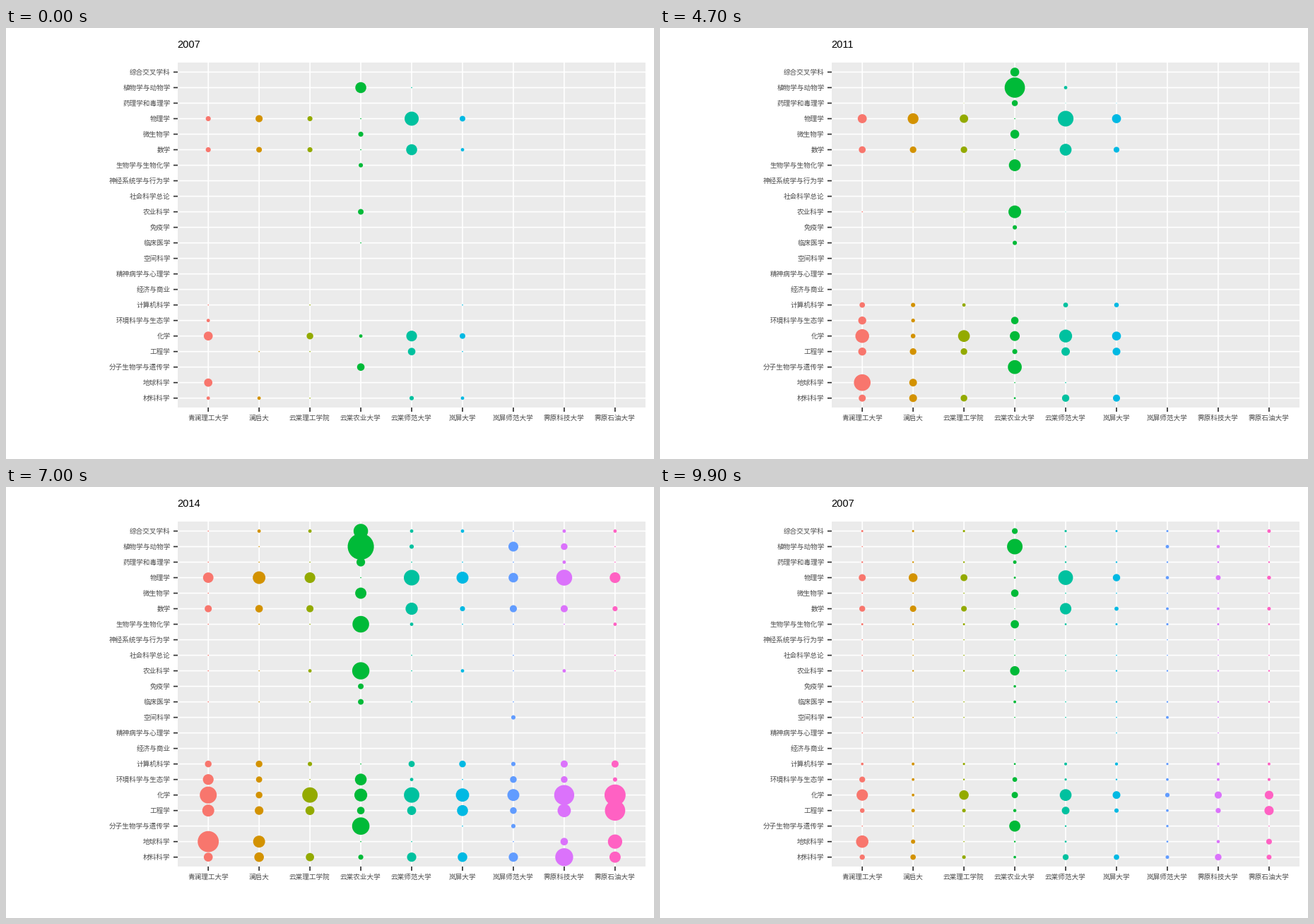
These frames come from a looping animation (917x611 px, 10000 ms). A matplotlib script:

```python
import numpy as np
import matplotlib.pyplot as plt
from matplotlib.animation import FuncAnimation
from matplotlib.colors import to_rgb
from matplotlib.patches import Rectangle

W, H, DPI = 917, 611, 72  # at 72 dpi one point is one pixel
LEFT, TOP, RIGHT, BOTTOM = 243, 49, 905, 538
X0, DX = 286.2, 71.96
Y0, DY = 62.5, 22.01
TICK = 6
CJK, LATIN = "Noto Sans CJK JP", "Liberation Sans"

FIRST_YEAR, YEARS = 2007, 10
STEPS, HOLD = 10, 6  # frames per year; the last still frame of each year
BASE, GAIN = 0.8, 1.6  # radius of a one-paper dot; growth per root of papers

# Usual trend of each subject: size in the first and in the last year.
# A size below zero means no papers, so no dot.
TRENDS = {
    "综合交叉学科": (-5, 2.8),
    "植物学与动物学": (-3, 0),
    "药理学和毒理学": (-2, 1.8),
    "物理学": (3, 8),
    "微生物学": (-2, 0.3),
    "数学": (3, 5),
    "生物学与生物化学": (-4, 2.3),
    "神经系统学与行为学": (-2, 0),
    "社会科学总论": (-2, 0.5),
    "农业科学": (-1.5, 1.8),
    "免疫学": (-9, -3),
    "临床医学": (-3, 1.2),
    "空间科学": (-4, 0.2),
    "精神病学与心理学": (-4, -0.2),
    "经济与商业": (-5, -0.5),
    "计算机科学": (0, 5),
    "环境科学与生态学": (-0.5, 5),
    "化学": (3, 9),
    "工程学": (1, 7),
    "分子生物学与遗传学": (-4, 0.8),
    "地球科学": (-0.5, 1.5),
    "材料科学": (1.5, 7.3),
}
SUBJECTS = list(TRENDS)

# Name, colour, first year with papers, and the subjects with their own trend.
SCHOOLS = [
    ("青澜理工大学", "#F8766D", 2007, {
        "化学": (5.8, 12.5), "工程学": (0.5, 10), "地球科学": (5.8, 17),
        "环境科学与生态学": (2.2, 8.5)}),
    ("澜启大", "#D39200", 2007, {
        "物理学": (4, 9.6), "化学": (0, 5), "地球科学": (0, 9.5)}),
    ("云棠理工学院", "#93AA00", 2007, {
        "化学": (4.2, 11.7), "地球科学": (-3, 0), "计算机科学": (0, 3),
        "环境科学与生态学": (-6, 2)}),
    ("云棠农业大学", "#00BA38", 2007, {
        "综合交叉学科": (-1, 13), "植物学与动物学": (7.2, 20),
        "药理学和毒理学": (0, 6.8), "物理学": (0.5, 1.7),
        "微生物学": (2, 9.5), "数学": (0, 0), "生物学与生物化学": (2.5, 13.5),
        "农业科学": (3.3, 14), "免疫学": (-1, 4.4), "临床医学": (0, 4.5),
        "计算机科学": (-2, 2.2), "环境科学与生态学": (-0.5, 10),
        "化学": (2.2, 10.4), "工程学": (0, 5.5),
        "分子生物学与遗传学": (4.5, 14), "材料科学": (-1, 4)}),
    ("云棠师范大学", "#00C19F", 2007, {
        "植物学与动物学": (0, 2.8), "物理学": (9.2, 11), "数学": (6.8, 8.2),
        "环境科学与生态学": (-4, 3), "化学": (7.2, 9.8),
        "工程学": (4.5, 5.3)}),
    ("岚屏大学", "#00B9E3", 2007, {
        "数学": (2, 3.6), "环境科学与生态学": (-3, 2), "工程学": (1, 9),
        "地球科学": (-1, 0.2)}),
    ("岚屏师范大学", "#619CFF", 2013, {
        "植物学与动物学": (4, 6.7), "物理学": (8, 6), "空间科学": (-6, 4.5),
        "计算机科学": (2, 2), "工程学": (5.5, 4),
        "分子生物学与遗传学": (-1, 3.5)}),
    ("霁原科技大学", "#DB72FB", 2013, {
        "综合交叉学科": (-10, 5.5), "植物学与动物学": (0, 5.2),
        "物理学": (8, 11), "化学": (-3, 17.5), "工程学": (-2, 11),
        "地球科学": (1, 5), "材料科学": (-1, 15.5)}),
    ("霁原石油大学", "#FF61C3", 2013, {
        "综合交叉学科": (-16, 6.4), "数学": (-10, 6.5),
        "环境科学与生态学": (-10, 5), "化学": (-8, 21),
        "工程学": (-18, 22.7), "地球科学": (-4, 13),
        "材料科学": (-6, 11)}),
]


def build_sizes():
    """Dot growth by year for every school and subject, NaN for no dot."""
    rng = np.random.default_rng(7)
    t = np.linspace(0, 1, YEARS)[:, None]
    blocks = []
    for _, _, opens, own in SCHOOLS:
        first, last = np.array(list({**TRENDS, **own}.values())).T
        size = first + (last - first) * t
        size += rng.normal(0, 0.35, size.shape)
        size[size < 0] = np.nan
        size[:opens - FIRST_YEAR] = np.nan
        # Papers come in whole numbers.
        blocks.append(GAIN * np.sqrt(np.round((size / GAIN) ** 2)))
    return np.hstack(blocks)


sizes = build_sizes()
xs = X0 + DX * np.arange(len(SCHOOLS))
ys = Y0 + DY * np.arange(len(SUBJECTS))

fig = plt.figure(figsize=((W + 0.01) / DPI, (H + 0.01) / DPI), dpi=DPI,
                 facecolor="white")
ax = fig.add_axes([0, 0, 1, 1])
ax.set_xlim(0, W)
ax.set_ylim(H, 0)
ax.axis("off")

panel = Rectangle((LEFT, TOP), RIGHT - LEFT, BOTTOM - TOP,
                  facecolor="#EBEBEB", linewidth=0, zorder=0)
ax.add_patch(panel)


def segment(x, y, color):
    ax.plot(x, y, color=color, linewidth=1.7, solid_capstyle="butt",
            snap=False, zorder=1)


def label(x, y, text, ha):
    ax.text(x, y, text, family=CJK, fontsize=9.6, color="#4D4D4D",
            ha=ha, va="baseline")


for y, subject in zip(ys, SUBJECTS):
    segment((LEFT, RIGHT), (y, y), "white")
    segment((LEFT - TICK, LEFT), (y, y), "#333333")
    label(232.6, y + 3.5, subject, "right")
for x, (school, *_) in zip(xs, SCHOOLS):
    segment((x, x), (TOP, BOTTOM), "white")
    segment((x, x), (BOTTOM, BOTTOM + TICK), "#333333")
    label(x - 0.3, 555.6, school, "center")

title = ax.text(LEFT - 0.4, 28, "", family=LATIN, fontsize=14.6,
                color="black", ha="left", va="baseline")

rgba = np.ones((sizes.shape[1], 4))
rgba[:, :3] = np.repeat([to_rgb(color) for _, color, *_ in SCHOOLS],
                        len(SUBJECTS), axis=0)
dots = ax.scatter(np.repeat(xs, len(SUBJECTS)), np.tile(ys, len(SCHOOLS)),
                  s=1, c=rgba, linewidths=0, zorder=2)
dots.set_clip_path(panel)


def draw(frame):
    year, step = divmod(frame, STEPS)
    t = max(0, step - HOLD) / (STEPS - HOLD)
    after = (year + 1) % YEARS
    a, b = sizes[year], sizes[after]
    here, there = ~np.isnan(a), ~np.isnan(b)

    # Leaving dots shrink, new dots fade in at full size.
    start = np.where(here, a, b)
    end = np.where(there, b, 0)
    radius = BASE + np.nan_to_num(start + (end - start) * t)
    alpha = np.where(here, 1.0, np.where(there, t, 0.0))

    colors = rgba.copy()
    colors[:, 3] = alpha
    dots.set_sizes(np.where(alpha > 0, (2 * radius) ** 2, 0))
    dots.set_facecolors(colors)
    title.set_text(str(FIRST_YEAR + (after if t >= 0.5 else year)))
    return dots, title


anim = FuncAnimation(fig, draw, frames=YEARS * STEPS, interval=100,
                     repeat=True, repeat_delay=0, blit=False)
plt.show()
```
